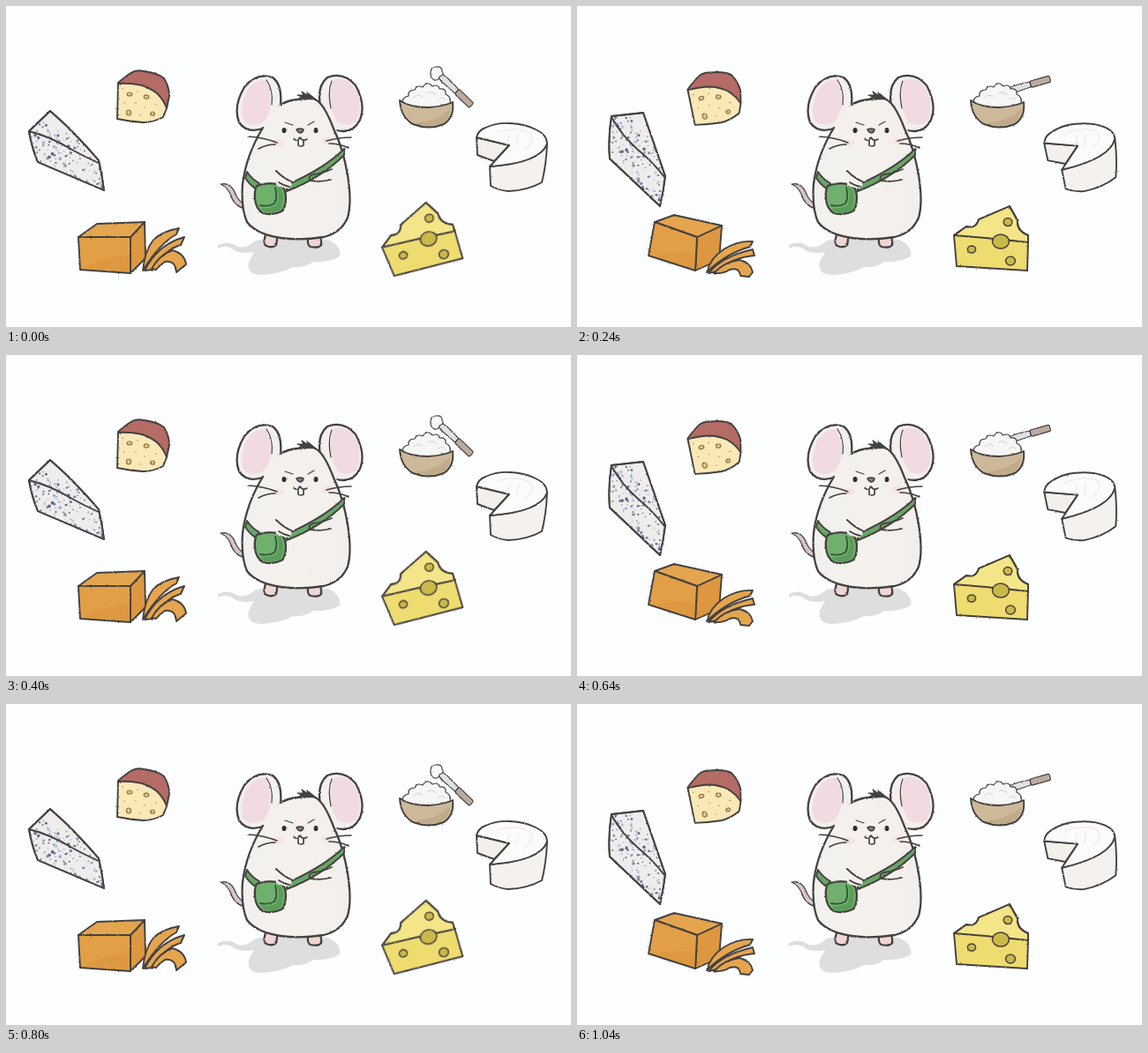
Write an HTML page that moves like this. It is 640 px wide and 364 px high and loops after 1.2 s.

```html
<!DOCTYPE html>
<html lang="en">
<head>
<meta charset="utf-8">
<title>Mouse and cheeses</title>
<style>
  html, body { margin: 0; width: 100%; height: 100%; overflow: hidden; background: #fdfeff; }
  svg { display: block; width: 100%; height: 100%; }
  .ink { stroke: #444140; stroke-width: 1.9; stroke-linejoin: round; stroke-linecap: round; fill: none; }
  .bold { stroke-width: 2.3; }
  .thin { stroke-width: 1.2; }
  .plain { stroke: none; }
</style>
</head>
<body>
<svg viewBox="0 0 640 364">
  <defs>
    <filter id="pencil" filterUnits="userSpaceOnUse" x="0" y="0" width="640" height="364" color-interpolation-filters="sRGB">
      <feTurbulence type="fractalNoise" baseFrequency=".45" numOctaves="2" seed="4"/>
      <feDisplacementMap in="SourceGraphic" scale="1.9" xChannelSelector="R" yChannelSelector="G"/>
    </filter>
    <linearGradient id="fur">
      <stop offset="0" stop-color="#f2f0ee"/><stop offset=".5" stop-color="#f5f2ed"/><stop offset="1" stop-color="#f1eeec"/>
    </linearGradient>
    <path id="wedgeA" d="M50 119L26 142Q29 160 36 177L111 209Q109 192 105 175Q78 144 60 128Z"/>
    <path id="wedgeB" d="M75 121L39 125Q35 150 37 173L94 227Q98 210 100 193Q88 158 75 121Z"/>
    <clipPath id="clipA"><use href="#wedgeA"/></clipPath>
    <clipPath id="clipB"><use href="#wedgeB"/></clipPath>
  </defs>

  <!-- shadow -->
  <path fill="#dededf" d="M240 271Q250 266 259 271Q269 278 283 266Q320 259 365 265Q381 273 378 284Q366 291 348 290Q340 297 325 296Q310 304 290 305Q272 305 275 290L281 279Q263 282 256 275Q248 271 240 275Z"/>

  <g class="ink bold" filter="url(#pencil)">
    <!-- tail, feet -->
    <path class="thin" fill="#d9c5c7" stroke-width="1.8" d="M243 202Q254 200 259 211Q263 222 271 225L271 230Q258 227 254 213Q250 205 243 202Z"/>
    <path fill="#efd5d3" d="M295 257Q290 270 295 272Q302 275 306 271Q308 263 306 257M343 259Q340 271 345 273Q354 275 357 271Q358 264 354 257"/>
    <!-- ears -->
    <path fill="#f2efed" d="M311 112Q313 89 302 81Q284 75 270 92Q257 114 264 132Q274 146 293 138Z"/>
    <path fill="#f2efed" d="M356 113Q352 91 364 81Q382 74 396 90Q408 112 401 129Q392 147 371 140Z"/>
    <g class="plain" fill="#f1dae0">
      <path d="M294 84Q281 83 272 97Q264 118 269 130Q278 139 292 131Q307 112 294 84Z"/>
      <path d="M371 84Q385 78 396 95Q405 115 397 130Q387 139 375 131Q362 108 371 84Z"/>
    </g>
    <path class="thin" d="M295 84Q303 95 301 112M369 85Q364 97 368 116"/>
    <!-- body -->
    <path class="plain" fill="url(#fur)" d="M312 110Q335 102 357 111Q375 133 384 170Q391 205 390 225Q387 250 370 259Q350 264 326 263Q292 262 278 252Q266 235 268 203Q271 171 290 138Q300 121 312 110Z"/>
    <path d="M311 112Q319 107 330 106M350 106Q360 110 371 139Q382 162 387 192Q392 223 387 240Q380 257 360 262Q334 266 311 263Q284 259 273 245Q266 229 268 202Q272 169 291 138"/>
    <path class="thin" fill="#444140" d="M328 107L335 103L330 101L337 101L335 97L342 102L341 98L351 106Q340 105 328 107Z"/>
    <!-- face -->
    <g class="plain">
      <ellipse cx="308" cy="155" rx="7" ry="4" fill="#f5e4e2"/>
      <ellipse cx="364" cy="153" rx="7" ry="4" fill="#f5e4e2"/>
      <ellipse cx="315" cy="141" rx="2.5" ry="3.1" fill="#302d2d"/>
      <ellipse cx="351" cy="141" rx="2.5" ry="3.1" fill="#302d2d"/>
    </g>
    <path stroke-width="1.6" fill="#8f7b79" d="M329 140Q333 138 337 140Q336 144 333 144Q330 143 329 140Z"/>
    <path stroke-width="1.2" d="M316 132L325 135M342 135L349 131"/>
    <path stroke-width="1.6" d="M326 151Q331 154 333 149Q336 154 341 151M274 148Q292 149 307 155M286 162Q295 157 305 157M363 153Q377 149 391 149M366 156Q378 156 388 161"/>
    <path stroke-width="1.7" fill="#fff" d="M331 153L331 158Q334 160 337 158L337 153"/>
    <!-- strap and bag -->
    <path fill="#68a665" stroke-width="1.9" d="M383 162Q361 184 318 203L318 210Q357 195 383 169Z"/>
    <path fill="#68a665" stroke-width="1.9" d="M273 188Q278 196 287 201L284 208Q276 203 271 195Z"/>
    <path fill="#70b06d" d="M284 204Q297 199 311 203Q317 207 317 217Q317 229 312 233Q302 238 291 235Q283 230 282 219Q281 209 284 204Z"/>
    <path class="plain" fill="#5a9c59" d="M306 206Q312 214 306 226Q300 230 289 229L292 233Q304 236 311 231Q317 217 311 206Z"/>
    <path stroke-width="1.8" stroke="#35543a" d="M305 206Q308 218 304 224Q297 228 288 226"/>
    <!-- arms -->
    <path class="plain" fill="#f4f1ed" d="M306 187Q314 194 322 198Q326 203 320 207Q313 206 306 203"/>
    <path stroke-width="1.8" d="M306 187Q314 195 323 199M309 200Q315 204 321 205M369 185Q358 190 348 191Q341 193 345 198Q357 200 368 197"/>
  </g>

  <g class="ink" filter="url(#pencil)">
    <!-- red rind -->
    <g data-b="translate(1 1) rotate(-13 155 102)">
      <path fill="#b56b66" d="M127 87Q136 79 143 75Q149 72 156 74Q172 76 179 82Q185 92 185 102L182 116L127 92Z"/>
      <path fill="#fae8b7" d="M127 88Q141 87 154 90Q165 94 171 99Q179 107 182 116L178 126Q167 132 155 132Q140 131 126 128Z"/>
      <g class="thin" fill="#e3c985" stroke="#8b7448">
        <ellipse cx="140" cy="100" rx="2.8" ry="2"/><ellipse cx="159" cy="103" rx="2.8" ry="2.2"/>
        <ellipse cx="139" cy="121" rx="2.6" ry="3"/><ellipse cx="166" cy="122" rx="2.4" ry="2"/>
      </g>
      <path stroke="#9a8050" stroke-width="1.4" d="M132 94h0M149 97h0M134 110h0M147 110h0M157 115h0M170 112h0M152 124h0"/>
    </g>

    <!-- blue wedge -->
    <g class="a">
      <use href="#wedgeA" fill="#efedec"/>
      <g clip-path="url(#clipA)"><g class="mold plain"></g></g>
      <path d="M26 142Q50 148 73 162Q89 171 105 178"/>
      <use href="#wedgeA"/>
    </g>
    <g class="b">
      <use href="#wedgeB" fill="#efedec"/>
      <g clip-path="url(#clipB)"><g class="mold plain" transform="translate(-1 1) rotate(23 68.5 175.5)"></g></g>
      <path d="M39 126Q51 147 68 162Q87 178 99 194"/>
      <use href="#wedgeB"/>
    </g>

    <!-- orange block and slices -->
    <g class="a" fill="#e5a54f">
      <path fill="#dd9740" d="M141 262L157 245L158 286L141 303Z"/>
      <path d="M82 262L103 247L157 245L141 262Z"/>
      <path fill="#e29f45" d="M82 262L141 262L141 303L84 299Z"/>
      <path class="plain" fill="#d68c38" d="M89 297Q108 286 139 282L140 301Z" opacity=".4"/>
      <path d="M155 300Q157 278 167 265Q178 255 196 252L193 259Q174 269 155 300Z"/>
      <path d="M157 300Q171 271 202 262L198 271Q180 276 166 299Z"/>
      <path d="M165 298Q173 283 188 277Q202 280 204 293L193 302Q192 288 180 290Q174 294 170 299Z"/>
    </g>
    <g class="b" fill="#e5a54f">
      <path fill="#dd9740" d="M136 262L164 249L161 288L134 300Z"/>
      <path d="M88 245L110 237L164 249L136 262Z"/>
      <path fill="#e29f45" d="M88 245L136 262L134 300L81 283Z"/>
      <path class="plain" fill="#d68c38" d="M88 283Q112 278 134 281L133 298Z" opacity=".4"/>
      <path d="M147 302Q151 286 166 276Q182 266 199 267L196 273Q168 281 147 302Z"/>
      <path d="M149 303Q164 284 199 276L201 283Q176 285 158 301Z"/>
      <path d="M155 303Q167 290 184 288Q197 291 199 302L195 307L185 306Q184 296 173 299Q165 304 155 303Z"/>
    </g>

    <!-- bowl -->
    <g transform="translate(487 74) rotate(44)" data-b="translate(482 98) rotate(-16)">
      <path class="thin" fill="#dfe1e5" d="M0 -1Q12 -5 33 -3L33 3L12 4Q3 3 0 -1Z"/>
      <rect class="thin" x="33" y="-3.7" width="23" height="7.4" rx="2" fill="#bcab9d"/>
    </g>
    <path class="a thin" fill="#f8f8f8" d="M481 75Q481 69 487 69Q494 68 494 74Q497 78 491 80Q490 85 485 84Q480 81 481 75Z"/>
    <path class="thin" fill="#f6f6f5" d="M449 112Q448 103 456 102Q455 95 463 95Q465 89 472 92Q477 84 483 91Q490 88 491 94Q499 93 498 100Q505 103 503 111Q480 124 449 112Z"/>
    <path class="thin" stroke="#d6d6d6" d="M462 104Q466 99 471 103M478 99Q483 96 487 101M490 106Q494 103 497 106"/>
    <path fill="#cdb999" d="M446 107Q457 115 478 115Q496 114 506 109Q508 126 496 134Q479 141 461 134Q447 126 446 107Z"/>
    <path class="plain" fill="#b8a07f" opacity=".6" d="M503 116Q492 129 463 133Q480 139 495 133Q503 127 503 116Z"/>

    <!-- white wheel -->
    <g data-b="translate(-1) rotate(-9 573 170)">
      <path fill="#f3efeb" d="M533 149L534 169L553 176L570 158Z"/>
      <path fill="#f4f1ee" d="M548 182L549 204Q558 209 569 210Q591 209 607 200Q612 180 613 156Q605 178 548 182Z"/>
      <path fill="#fcfbfa" d="M533 149Q535 141 543 138Q556 132 571 133Q589 134 600 140Q613 146 613 156Q605 178 548 182L570 158Z"/>
      <path class="thin" stroke="#eeeae8" d="M556 143Q578 136 594 145Q600 154 587 163M571 147L567 157M581 146L578 159"/>
    </g>

    <!-- yellow wedge -->
    <g transform="translate(-2 -1) rotate(-18 474 264)" data-b="">
      <path fill="#efdc70" d="M427 260L441 250Q452 253 455 242L490 227L499 243Q498 255 511 260L511 268L510 300L430 295Z"/>
      <path class="plain" fill="#f3e588" d="M430 260L441 252Q453 254 456 244L488 229L497 244Q497 256 510 261L510 267Z"/>
      <path d="M427 260Q468 263 511 268M427 260L441 250Q452 253 455 242L490 227L499 243Q498 255 511 260L511 268"/>
      <g fill="#cab849" stroke-width="1.5">
        <ellipse cx="480" cy="267" rx="9.5" ry="8"/><ellipse cx="488" cy="245" rx="4.8" ry="4.5"/>
        <ellipse cx="447" cy="276" rx="4.6" ry="4"/><ellipse cx="491" cy="289" rx="5.4" ry="5"/>
      </g>
    </g>
  </g>
</svg>
<script>
  const all = sel => [...document.querySelectorAll(sel)];

  // blue mold specks
  let seed = 11;
  const rnd = () => (seed = seed * 16807 % 2147483647) / 2147483647;
  const shades = ['#6d7aa8', '#9ba6ca', '#5f6685', '#c3cadd', '#90929f'];
  let specks = '';
  for (let i = 0; i < 200; i++) {
    const u = rnd(), x = 26 + 84 * u, y = 118 + 52 * u + 52 * rnd();
    specks += `<circle cx="${x}" cy="${y}" r="${.5 + 1.4 * rnd() ** 2}" fill="${shades[i % 5]}"/>`;
  }
  all('.mold').forEach(g => g.innerHTML = specks);

  const movers = all('[data-b]').map(el => [el, el.getAttribute('transform') || '', el.dataset.b]);
  const first = all('.a'), second = all('.b');
  let last;

  function draw(now) {
    const tilted = now % 400 >= 240;
    if (tilted === last) return;
    last = tilted;
    movers.forEach(([el, a, b]) => el.setAttribute('transform', tilted ? b : a));
    first.forEach(el => el.style.display = tilted ? 'none' : '');
    second.forEach(el => el.style.display = tilted ? '' : 'none');
  }

  const start = performance.now();
  function tick() {
    draw(performance.now() - start);
    requestAnimationFrame(tick);
  }
  tick();
</script>
</body>
</html>
```
